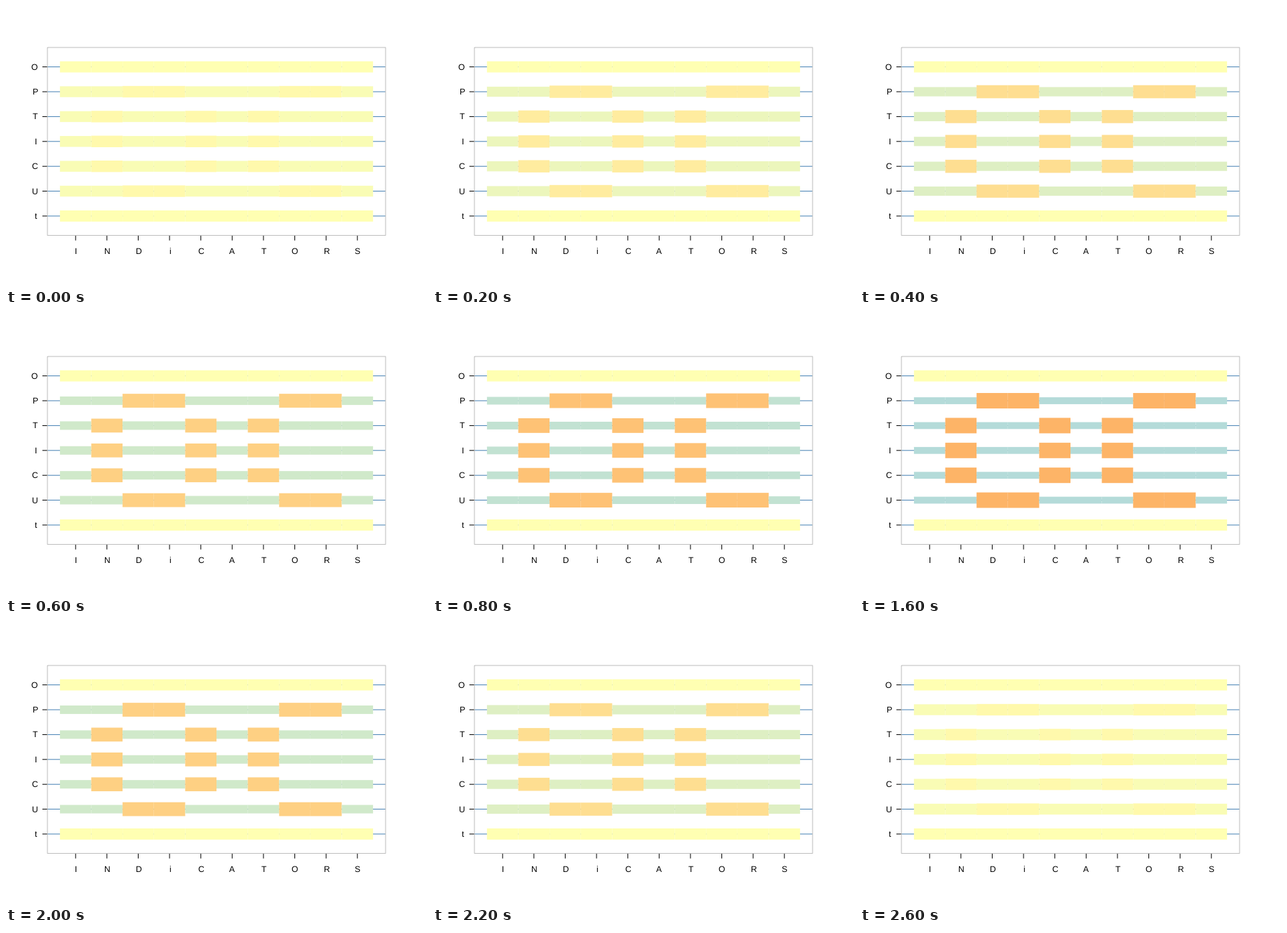
A matplotlib script for the animation above (2.8 s loop, 600 px wide and 400 px high).

```python
import matplotlib.pyplot as plt
from matplotlib.animation import FuncAnimation
from matplotlib.patches import Rectangle

W, H, DPI = 600, 400, 100
PX = 72 / DPI  # points per pixel
LEFT, RIGHT, TOP, BOTTOM = 59.04, 540.96, 59.04, 326.56
ROWS, COLS = "OPTICUt", "INDiCATORS"
RAISED = {"P": "DiOR", "U": "DiOR", "T": "NCT", "I": "NCT", "C": "NCT"}
RAISED_COLS = {"DiOR": (2, 3, 7, 8), "NCT": (1, 4, 6)}

YELLOW = (255, 255, 178)
WARM_STEP = (-0.3, -13.8, -13.9)
COOL_STEP = (-13.9, -6.6, 7.2)
BASE_HEIGHT, HEIGHT_STEP = 15.9, 1.13

CELL_W = (RIGHT - LEFT) / 1.08 / len(COLS)
CELL_H = (BOTTOM - TOP) / 1.08 / len(ROWS)
X0 = LEFT + 0.04 * CELL_W * len(COLS)
Y0 = TOP + 0.04 * CELL_H * len(ROWS)

plt.rcParams.update({"font.family": "Liberation Sans", "text.hinting": "none"})
fig = plt.figure(figsize=(W / DPI, H / DPI), dpi=DPI, facecolor="white")
ax = fig.add_axes([0, 0, 1, 1])
ax.set(xlim=(0, W), ylim=(H, 0))
ax.axis("off")


def line(xs, ys, color, z):
    ax.plot(xs, ys, color=color, lw=PX, zorder=z, snap=False,
            solid_capstyle="butt", solid_joinstyle="round")


def label(x, y, text, align):
    ax.text(x, y, text, ha=align, va="baseline", size=12 * PX, color="black")


def row_y(i):
    return Y0 + (i + 0.5) * CELL_H


def shade(step, amount):
    return tuple((c + d * amount) / 255 for c, d in zip(YELLOW, step))


bars = []  # (patch, row centre, direction)
for i, name in enumerate(ROWS):
    y = row_y(i)
    line([LEFT, RIGHT], [y, y], "steelblue", 1)
    line([LEFT - 7.2, LEFT], [y, y], "black", 3)
    label(LEFT - 14.4, y + 4, name, "right")
    raised = RAISED_COLS.get(RAISED.get(name), ())
    for j in range(len(COLS)):
        direction = 0 if name not in RAISED else 1 if j in raised else -1
        bar = Rectangle((X0 + j * CELL_W, y - BASE_HEIGHT / 2), CELL_W,
                        BASE_HEIGHT, lw=0, fc=shade((0, 0, 0), 0),
                        zorder=2, snap=False)
        ax.add_patch(bar)
        if direction:
            bars.append((bar, y, direction))

for j, name in enumerate(COLS):
    x = X0 + (j + 0.5) * CELL_W
    line([x, x], [BOTTOM, BOTTOM + 7.2], "black", 3)
    label(x, 353, name, "center")

line([LEFT, RIGHT, RIGHT, LEFT, LEFT], [TOP, TOP, BOTTOM, BOTTOM, TOP],
     "#bebebe", 4)


def update(frame):
    amount = min(frame, 13 - frame) + 0.4  # rise, then mirror back
    warm, cool = shade(WARM_STEP, amount), shade(COOL_STEP, amount)
    for bar, y, direction in bars:
        height = BASE_HEIGHT + direction * HEIGHT_STEP * amount
        bar.set_y(y - height / 2)
        bar.set_height(height)
        bar.set_facecolor(warm if direction > 0 else cool)
    return [bar for bar, _, _ in bars]


anim = FuncAnimation(fig, update, frames=14, interval=200, repeat=True,
                     repeat_delay=0, blit=False)
plt.show()
```
